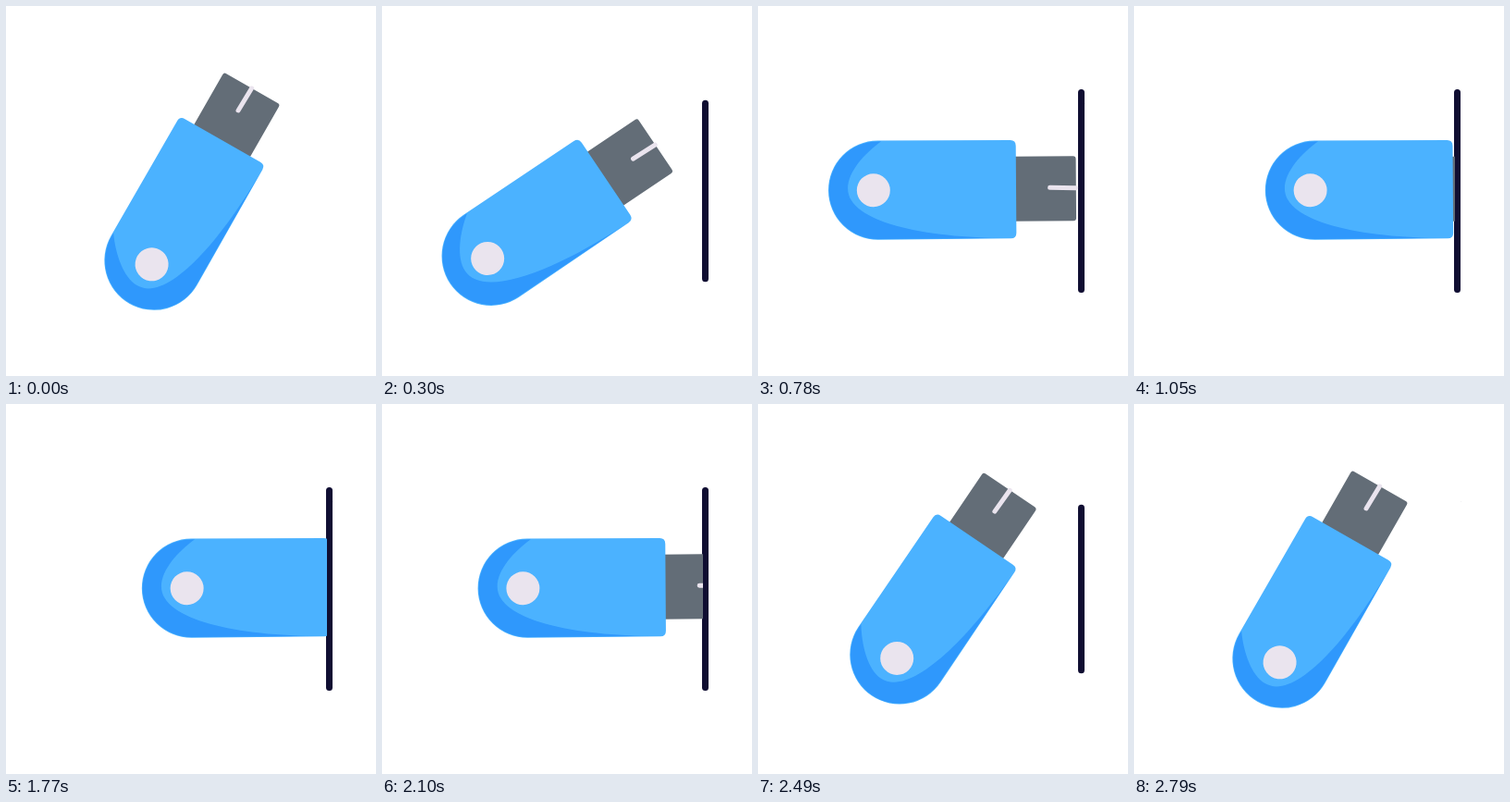
An HTML page that plays this animation: 400x400 px, repeating every 5.09 s.

```html
<!DOCTYPE html>
<html lang="en">
<head>
<meta charset="utf-8">
<title>USB stick</title>
<style>
  html, body { margin: 0; width: 100%; height: 100%; overflow: hidden; background: #fff; }
  svg { display: block; width: 100%; height: 100%; }
</style>
</head>
<body>
<svg viewBox="0 0 400 400">
  <defs>
    <clipPath id="room"><rect width="347" height="400"/></clipPath>
  </defs>
  <rect id="wall" x="346" width="7" rx="3.5" fill="#100e32"/>
  <g clip-path="url(#room)">
    <g id="stick">
      <rect x="140" y="-35.5" width="74.2" height="70" rx="3" fill="#636d77"/>
      <path d="M186 -1.6L214 -0.9" stroke="#eae4ee" stroke-width="5" stroke-linecap="round"/>
      <path fill="#4bb2ff" d="M0 -53.6L143.4 -53.2Q149.4 -53.2 149.4 -47V47Q149.4 53 143.4 53L0 53.6A53.6 53.6 0 0 1 0 -53.6Z"/>
      <path fill="#2f98fc" d="M4 -52.8H0A52.8 52.8 0 0 0 0 52.8L140 52.6C50 52 -32.5 34 -32.5 -2C-32.5 -20 -14 -40 4 -52.8Z"/>
      <circle cx="-4.8" r="18" fill="#eae4ee"/>
    </g>
  </g>
</svg>
<script>
const LOOP = 5090, STEP = 30;
const REST = { x: 200.5, y: 200.4, angle: -60.2 };
const PLUGGED = { x: 286.5, y: 196.6, angle: -0.4 };
const stick = document.getElementById('stick');
const wall = document.getElementById('wall');

const mix = (a, b, k) => a + (b - a) * k;
const part = (t, from, to) => Math.min(1, Math.max(0, (t - from) / (to - from)));
const smooth = u => u * u * (3 - 2 * u);
const arch = u => Math.sin(Math.PI * u);

// Swing back to aim, then push into the wall
function plugIn(t) {
  const turn = part(t, 0, 665);
  const k = (turn + smooth(turn)) / 2;
  const back = mix(REST.x, 164.5, part(t, 0, 500) ** 2);
  return {
    x: mix(back, PLUGGED.x, smooth(part(t, 500, 1136))),
    y: mix(REST.y, PLUGGED.y, k) + 23 * arch(part(t, 0, 700)),
    angle: mix(REST.angle, PLUGGED.angle, k)
  };
}

// Pull out, turn upright with a small overshoot and settle
function pullOut(t) {
  const k = smooth(part(t, 2165, 2565));
  const over = arch(part(t, 2465, 2790));
  const out = mix(PLUGGED.x, 198.2, part(t, 1740, 2310) ** 1.5);
  return {
    x: mix(out, REST.x, smooth(part(t, 2310, 2790))),
    y: mix(PLUGGED.y, REST.y, k) + 6.5 * arch(part(t, 2260, 2440)) - 2.4 * over,
    angle: mix(PLUGGED.angle, REST.angle, k) - 5 * over
  };
}

function draw(t) {
  const { x, y, angle } = t < 1740 ? plugIn(t) : pullOut(t);
  stick.setAttribute('transform',
    `translate(${x} ${y}) rotate(${angle}) translate(-85 2)`);

  const grow = 1 - (1 - part(t, 0, 570)) ** 3;
  const half = 110 * grow * (1 - part(t, 2280, 2790) ** 2);
  wall.setAttribute('y', 200 - half);
  wall.setAttribute('height', 2 * half);
}

const start = performance.now();
function tick() {
  const t = (performance.now() - start) % LOOP;
  draw(Math.floor(t / STEP) * STEP);
  requestAnimationFrame(tick);
}
tick();
</script>
</body>
</html>
```
